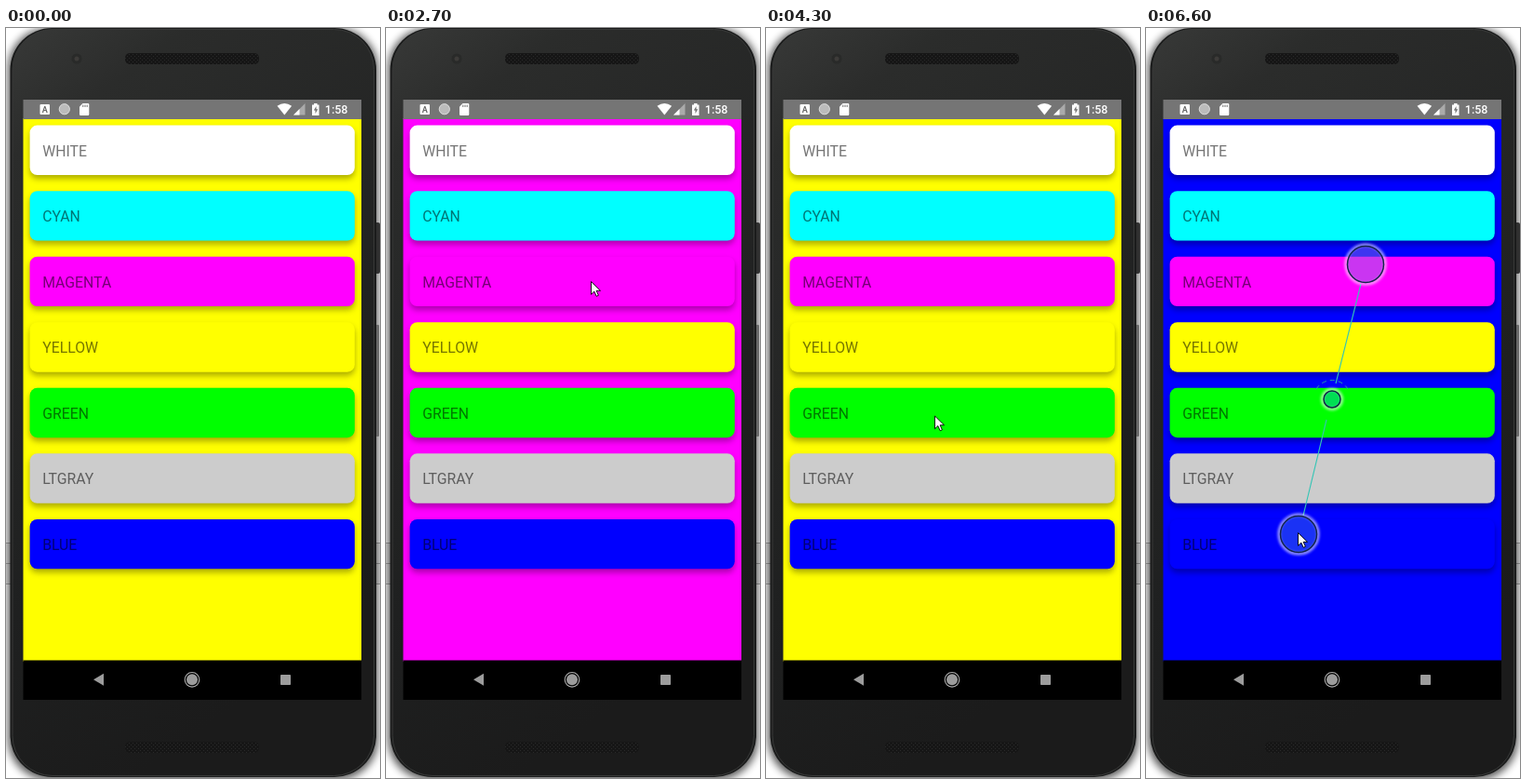
These frames come from a looping animation (402x806 px, 6700 ms). An HTML page:

```html
<!DOCTYPE html>
<html lang="en">
<head>
<meta charset="utf-8">
<title>Colour list</title>
<style>
html, body { margin: 0; width: 100%; height: 100%; overflow: hidden; background: #fff; }
svg { display: block; }
text { font-family: Roboto, "Liberation Sans", sans-serif; }
.card { filter: drop-shadow(0 4px 3px rgba(0, 0, 0, .32)); }
.label { font-size: 15.8px; fill: #000; fill-opacity: .54; }
</style>
</head>
<body>
<svg width="402" height="806" viewBox="0 0 402 806">
  <defs>
    <linearGradient id="metal" x1="0" y1="0" x2=".35" y2="1">
      <stop offset="0" stop-color="#383938"/>
      <stop offset=".15" stop-color="#2b2c2b"/>
      <stop offset=".7" stop-color="#1f2020"/>
      <stop offset="1" stop-color="#1b1b1b"/>
    </linearGradient>
    <pattern id="mesh" width="4" height="4" patternUnits="userSpaceOnUse">
      <rect width="4" height="4" fill="#161616"/>
      <path d="M0 0h1v1h-1zM2 2h1v1h-1z" fill="#2a2a2a"/>
    </pattern>
    <filter id="soft" x="-10%" y="-10%" width="120%" height="120%"><feGaussianBlur stdDeviation="4.5"/></filter>
    <filter id="glow" x="-50%" y="-50%" width="200%" height="200%"><feGaussianBlur stdDeviation="1.5"/></filter>
  </defs>

  <!-- Desktop behind the phone -->
  <rect y="553" width="402" height="45" fill="#ececec"/>
  <path d="M0 553.5h402M0 575.5h402M0 597.5h402" stroke="#aaa"/>
  <rect x="2" y="0" width="398" height="808" rx="44" fill="#000" opacity=".65" filter="url(#soft)"/>

  <!-- Phone body -->
  <path d="M397 209h3q2 0 2 2v51q0 2-2 2h-3z" fill="#303030"/>
  <rect x="397" y="319" width="4" height="120" rx="1" fill="#686868"/>
  <rect x="4.5" y="0" width="393.5" height="805" rx="45" fill="#1a1b1b"/>
  <rect x="7" y="1.5" width="388.5" height="802" rx="43" fill="url(#metal)" stroke="#383938"/>
  <rect x="128" y="27" width="144" height="12" rx="5" fill="url(#mesh)"/>
  <rect x="128" y="767" width="144" height="12" rx="5" fill="url(#mesh)"/>
  <circle cx="76" cy="33" r="5.5" fill="#292a29"/>
  <circle cx="76" cy="33" r="2.5" fill="#3d3b39"/>

  <!-- Screen -->
  <rect id="page" x="18.5" y="97" width="363.5" height="584"/>
  <rect x="18.5" y="77" width="363.5" height="21" fill="#757575"/>
  <rect x="18.5" y="679.5" width="363.5" height="42.5" fill="#000"/>

  <!-- Status bar -->
  <g fill="#fff">
    <rect x="36.5" y="82" width="10.5" height="11" rx="1"/>
    <text x="41.8" y="91" font-size="9" font-weight="700" text-anchor="middle" style="fill:#666">A</text>
    <circle cx="62.8" cy="87.2" r="5.6" fill="#bbb" stroke="#ddd"/>
    <path d="M82.5 81H88q1.3 0 1.3 1.3v10.4q0 1.3-1.3 1.3h-7.7q-1.3 0-1.3-1.3V84.5z"/>
    <path d="M82.8 82.5v2.5M85 82.5v2.5M87.2 82.5v2.5" stroke="#757575"/>
    <path d="M291.5 83.8q7.8-5.5 15.6 0L299.3 93.5z"/>
    <path d="M321.5 81v12.5H309z" fill="#aaa"/>
    <path d="M315.5 87v6.5H309z"/>
    <path d="M331 81h3.5v1.5h2V94h-7.5V82.5h2z"/>
    <path d="M333.5 84l-2.7 4.6h1.7v3.4l2.8-4.7h-1.8z" fill="#757575"/>
    <text x="342.8" y="92" font-size="12.5" font-weight="500">1:58</text>
  </g>

  <!-- Navigation bar -->
  <g fill="#9c9c9c">
    <path d="M94 700.3l11-6.5v13z"/>
    <circle cx="200" cy="700.3" r="6"/>
    <circle cx="200" cy="700.3" r="7.8" fill="none" stroke="#b0b0b0" stroke-width="1.1"/>
    <rect x="295" y="695" width="11" height="11" rx=".8"/>
  </g>

  <g id="list"></g>

  <!-- Two-finger touch overlay -->
  <g id="touch" fill="none">
    <path d="M231 275L204 382M194 421L169 524" stroke="#35c5b5" stroke-width="1.1"/>
    <path d="M183 388a20 20 0 0 1 34 0" stroke="#28a0a0" stroke-dasharray="5 4"/>
  </g>

  <path id="cursor" d="M.5.5v13.8l3.3-3.2 2.4 5.2 2.2-1-2.3-5h4.4z" fill="#fff" stroke="#000" stroke-width=".9"/>
</svg>
<script>
const LOOP = 6700, STEP = 100, TOUCH_AT = 6500;
const colors = {
  WHITE: '#fff', CYAN: '#0ff', MAGENTA: '#f0f', YELLOW: '#ff0',
  GREEN: '#0f0', LTGRAY: '#ccc', BLUE: '#00f'
};
const clicks = [
  [0, 'YELLOW'], [1500, 'WHITE'], [2000, 'CYAN'], [2700, 'MAGENTA'],
  [3500, 'YELLOW'], [4500, 'GREEN'], [5000, 'LTGRAY'], [5800, 'BLUE']
];
// Pointer stops: time, x, y
const stops = [
  [700, 0, 420], [1200, 352, 142.5], [1500, 352, 142.5], [2000, 240, 199.5],
  [2200, 240, 199.5], [2600, 220, 272], [2750, 220, 272], [3100, 204, 351.5],
  [3500, 204, 351.5], [4200, 181, 416.5], [4500, 181, 416.5], [5000, 171, 481.5],
  [5200, 171, 481.5], [5700, 163, 542], [LOOP, 163, 542]
];
const $ = id => document.getElementById(id);

function add(parent, tag, attrs, text = '') {
  const el = document.createElementNS('http://www.w3.org/2000/svg', tag);
  for (const key in attrs) el.setAttribute(key, attrs[key]);
  el.textContent = text;
  parent.append(el);
}

Object.entries(colors).forEach(([name, fill], i) => {
  const y = 104.6 + i * 70.55;
  add($('list'), 'rect', { class: 'card', x: 25.6, y, width: 349.2, height: 53.4, rx: 8, fill });
  add($('list'), 'text', { class: 'label', x: 39.2, y: y + 33 }, name);
});

function addDot(cx, cy, r, fill) {
  add($('touch'), 'circle', { cx, cy, r: r + 1.5, stroke: '#fff', 'stroke-width': 2.5, opacity: .8, filter: 'url(#glow)' });
  add($('touch'), 'circle', { cx, cy, r, fill, 'fill-opacity': .45, stroke: '#13254a', 'stroke-width': 1.5 });
}
addDot(236, 254, 19.5, '#8a75e0');
addDot(164, 544, 19.5, '#3a70e8');
addDot(200, 399, 9, '#00b8b8');

function pointerAt(t) {
  const i = Math.max(1, stops.findIndex(s => s[0] > t));
  const [t0, x0, y0] = stops[i - 1], [t1, x1, y1] = stops[i];
  const p = (t - t0) / (t1 - t0), e = p * p * (3 - 2 * p);
  return [x0 + (x1 - x0) * e, y0 + (y1 - y0) * e];
}

function draw(now) {
  const t = Math.floor(now % LOOP / STEP) * STEP;
  const [, name] = clicks.filter(c => c[0] <= t).pop();
  $('page').setAttribute('fill', colors[name]);
  $('touch').style.display = t >= TOUCH_AT ? '' : 'none';
  $('cursor').style.display = t >= stops[0][0] ? '' : 'none';
  if (t >= stops[0][0]) $('cursor').setAttribute('transform', `translate(${pointerAt(t)})`);
}

const start = performance.now();
function tick() {
  draw(performance.now() - start);
  requestAnimationFrame(tick);
}
tick();
</script>
</body>
</html>
```
